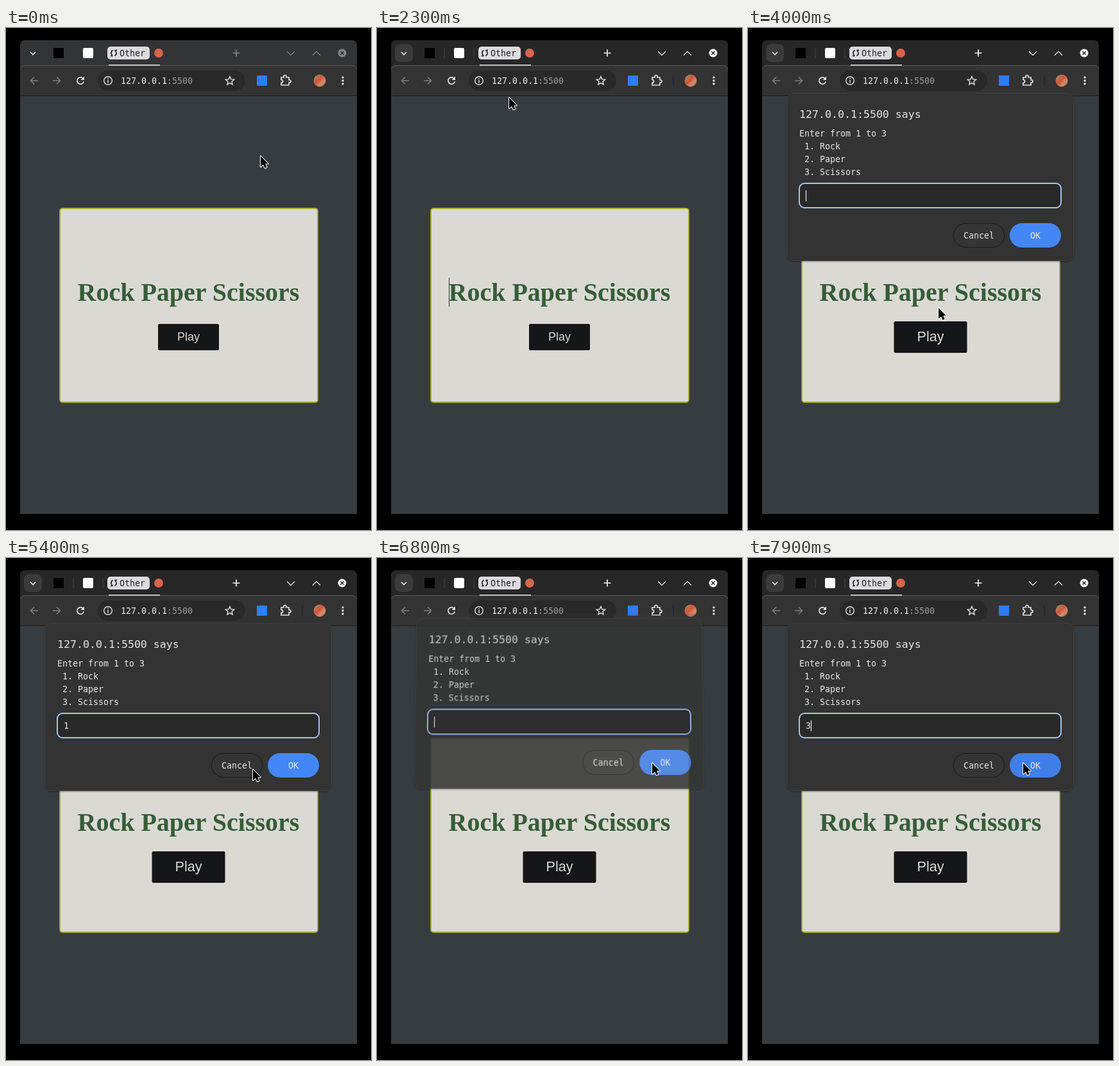
An HTML page for the animation above (8 s loop, 569x782 px).

```html
<!DOCTYPE html>
<html lang="en">
<head>
<meta charset="utf-8">
<title>Rock Paper Scissors</title>
<style>
  html, body { margin: 0; width: 100%; height: 100%; overflow: hidden; background: #000; }
  #stage { position: relative; width: 100%; height: 100%; overflow: hidden; contain: strict; }
  svg { position: absolute; left: 0; top: 0; width: 569px; height: 782px; overflow: hidden; }
  text { white-space: pre; }
  .mono { font: 13.3px "DejaVu Sans Mono", monospace; }
  .line { fill: none; stroke: #e3e3e3; stroke-width: 1.7; }
  .strip { fill: #333435; }
  .controls { color: #858585; }
  .controls .line { stroke: currentColor; }
  .focus { visibility: hidden; }
  .active .strip { fill: #272727; }
  .active .controls { color: #f2f2f2; }
  .active .focus { visibility: visible; }
  #play { transform-origin: 284.5px 481.5px; }
  svg.dialog { left: 50px; top: 90px; width: 470px; height: 290px; transform-origin: 234px 142px; fill: #e6e6e6; }
  .dialog .panel { filter: drop-shadow(0 1px 1px #0006); }
  .ok { fill: #4387f6; }
  .ok.hover { fill: #417fe8; }
  #pointer path { fill: #000; stroke: #fff; stroke-width: 2; stroke-linejoin: round; paint-order: stroke; }
</style>
</head>
<body>
<div id="stage">
<svg id="scene" viewBox="0 0 569 782">
  <defs>
    <linearGradient id="avatar" x2="1" y2="1">
      <stop stop-color="#7fa66a"/><stop offset=".45" stop-color="#d8503c"/>
      <stop offset=".7" stop-color="#c9966c"/><stop offset="1" stop-color="#b83a38"/>
    </linearGradient>
  </defs>
  <path fill="#373c40" d="M22 60H547V757H22Z"/>
  <path class="strip" d="M22 62V27Q22 19 30 19H539Q547 19 547 27V62Z"/>
  <path fill="#333" d="M22 105V66Q22 58 30 58H539Q547 58 547 66V105Z"/>
  <path fill="none" stroke="#5b5b5b" d="M22.5 64Q23 58.5 30 58.5H539Q546 58.5 546.5 64"/>
  <path stroke="#1d1e1f" d="M22 105.5H547"/>

  <!-- tab strip -->
  <rect class="focus" x="28" y="25" width="28" height="28" rx="8" fill="#3b3b3b"/>
  <path class="line" d="M38 37.5L42 41.5 46 37.5"/>
  <rect x="74" y="31" width="16" height="16" fill="#000"/>
  <rect x="120" y="31" width="16" height="16" rx="2" fill="#fff"/>
  <path class="focus" stroke="#454545" d="M105 31V47M151 31V47"/>
  <rect x="158" y="29" width="66" height="20" rx="5" fill="#dcdcde"/>
  <path fill="none" stroke="#1c1c1c" stroke-width="1.7" d="M166.5 34.5A5 5 0 0 0 166 43M166.5 43.5H163M169.5 43.5A5 5 0 0 0 170 35M169.5 34.5H173"/>
  <text class="mono" x="177" y="44" fill="#222">Other</text>
  <circle cx="238" cy="39" r="7" fill="#d9644c"/>
  <path stroke="#e4e4e4" stroke-width="1.6" d="M160 57.8H240"/>
  <g class="controls">
    <path class="line" d="M353.5 39H364.5M359 33.5V44.5"/>
    <path class="line" style="stroke-width:1.1" d="M438 36.5L444 42.5 450 36.5M478 42.5L484 36.5 490 42.5"/>
    <circle cx="524" cy="39" r="6.5" fill="currentColor"/>
    <path stroke="#272727" stroke-width="1.5" d="M521.5 36.5L526.5 41.5M526.5 36.5L521.5 41.5"/>
  </g>

  <!-- toolbar -->
  <path class="line" style="stroke:#7d7d7d" d="M50 82H39M44 76.5L38.5 82 44 87.5M73 82H84M79 76.5L84.5 82 79 87.5"/>
  <path class="line" d="M120.5 79A5.3 5.3 0 1 0 121.3 83.5"/>
  <path fill="#e3e3e3" d="M122 75.5V81H116.5Z"/>
  <rect x="143" y="66" width="230" height="32" rx="16" fill="#292929"/>
  <circle class="line" style="stroke-width:1.4" cx="159" cy="82" r="6.3"/>
  <path class="line" style="stroke-width:1.5" d="M159 81V85.5M159 78.2V79.8"/>
  <text class="mono" x="179" y="87" fill="#ededed">127.0.0.1<tspan fill="#9b9b9b">:5500</tspan></text>
  <path class="line" style="stroke-width:1.4" d="M349 75.5L350.9 79.9 355.7 80.3 352 83.4 353.1 88.1 349 85.6 344.9 88.1 346 83.4 342.3 80.3 347.1 79.9Z"/>
  <rect x="391" y="74" width="16" height="16" fill="#2f7cf6"/>
  <path class="line" d="M429 77H433V75.5A2 2 0 0 1 437 75.5V77H441V81H442A2 2 0 0 1 442 85H441V89H429V85.5A2.5 2.5 0 0 0 429 80.5Z"/>
  <path class="focus" stroke="#252b35" stroke-width="2" d="M462 74V90"/>
  <circle cx="489" cy="82" r="9.5" fill="url(#avatar)"/>
  <g fill="#e8e8e8"><circle cx="525" cy="77" r="1.7"/><circle cx="525" cy="82" r="1.7"/><circle cx="525" cy="87" r="1.7"/></g>

  <!-- page -->
  <rect x="84" y="281" width="402" height="302" rx="4" fill="#dad9d4" stroke="#a5ae2a" stroke-width="1.8"/>
  <text x="111.5" y="425" fill="#365d38" font-family="Liberation Serif, serif" font-weight="700" font-size="40">Rock Paper Scissors</text>
  <path id="textCaret" stroke="#333" d="M112.5 389V434"/>
  <g id="play">
    <rect x="237" y="461" width="95" height="41" rx="2" fill="#151618"/>
    <text x="284.5" y="487" fill="#dad9d4" text-anchor="middle" font-family="Liberation Sans, sans-serif" font-size="18">Play</text>
  </g>
</svg>

<svg class="dialog mono" viewBox="50 90 470 290">
  <rect class="panel" x="60.5" y="101.5" width="447" height="261" rx="10" fill="#333" stroke="#414141"/>
  <text x="80" y="140" font-size="16.6">127.0.0.1:5500 says</text>
  <text x="80" y="169">Enter from 1 to 3</text>
  <text x="80" y="189"> 1. Rock</text>
  <text x="80" y="209"> 2. Paper</text>
  <text x="80" y="229"> 3. Scissors</text>
  <rect x="80" y="242" width="408" height="38" rx="8" fill="#292929" stroke="#a8c2f5" stroke-width="2"/>
  <text class="value" x="90" y="266"></text>
  <path class="caret" stroke="#eee" stroke-width="1.2" d="M90.5 253V270"/>
  <rect x="320.5" y="304.5" width="79" height="37" rx="18.5" fill="#353535" stroke="#1b1b1b"/>
  <text x="360" y="328" text-anchor="middle">Cancel</text>
  <rect class="ok" x="408" y="304" width="80" height="38" rx="19"/>
  <text x="448" y="328" text-anchor="middle">OK</text>
</svg>

<svg viewBox="0 0 569 782">
  <g id="pointer">
    <path id="arrow" d="M0 .5V17.5L4 13.8 6.7 19.3 9.6 18 7.1 12.6H11.8Z"/>
    <path id="hand" d="M-2.5 1.5A1.8 1.8 0 0 1 1 .8L2.5 7.5 10 9Q13.5 10 13.3 13L12.5 21.5H2L-4.5 14Q-5 11.5-2.5 11.5L0 13Z"/>
  </g>
</svg>
</div>

<script>
const LOOP = 8000, STEP = 100;
const $ = selector => document.querySelector(selector);

// Points are [position, ...values]; values are joined linearly.
function track(points, at) {
  const next = points.findIndex(p => p[0] > at);
  if (next === 0) return points[0].slice(1);
  if (next < 0) return points.at(-1).slice(1);
  const a = points[next - 1], b = points[next];
  const f = (at - a[0]) / (b[0] - a[0]);
  return a.slice(1).map((v, i) => v + (b[i + 1] - v) * f);
}

const cursorPath = [
  [0, 397, 199], [100, 330, 172], [200, 248, 132], [300, 206, 108],
  [2400, 206, 108], [2600, 250, 55], [2700, 320, 36], [2800, 395, 75],
  [2900, 435, 170], [3000, 415, 300], [3100, 365, 405], [3200, 318, 464], [3300, 297, 480],
  [3700, 297, 480], [4200, 297, 406], [4300, 297, 406], [4500, 298, 404],
  [5000, 298, 404], [5200, 328, 374], [5400, 385, 329], [5600, 415, 321], [5900, 429, 319]
];

// Dialog poses: [phase, opacity, tilt]
const opening = [[0, 0, 1], [1, .22, 1], [2, .84, .43], [3, 1, 0]];
const closing = [[0, .92, .1], [1, .6, .5], [2, .2, .85], [3, 0, 1]];

const rounds = [
  { start: 3400, span: 300, typed: 4400, key: "1" },
  { start: 5900, span: 200, typed: 6200, key: "2" },
  { start: 6600, span: 300, typed: 7000, key: "2" },
  { start: 7500, span: 300, typed: 7900, key: "3" }
];

const current = $(".dialog");
const previous = current.cloneNode(true);
current.before(previous);

function poseDialog(el, [opacity, tilt], value, hover, caret) {
  el.style.opacity = opacity;
  el.style.transform = tilt
    ? `translateY(${-15 * tilt}px) perspective(1000px) rotateX(${8.2 * tilt}deg) scale(${1 + .007 * tilt}, ${1 + .04 * tilt})`
    : "none";
  el.querySelector(".value").textContent = value;
  const mark = el.querySelector(".caret");
  mark.style.visibility = caret ? "inherit" : "hidden";
  mark.setAttribute("transform", `translate(${value.length * 8})`);
  el.querySelector(".ok").classList.toggle("hover", hover);
}

function drawDialogs(t, hover) {
  const index = rounds.findLastIndex(r => t >= r.start);
  const visible = index >= 0;
  current.style.display = previous.style.display = visible ? "" : "none";
  if (!visible) return;
  const round = rounds[index], last = rounds[index - 1];
  const phase = (t - round.start) / round.span * 3;
  const caret = t < 5100 || t >= 5600;
  poseDialog(current, track(opening, phase), t >= round.typed ? round.key : "", hover, caret);
  poseDialog(previous, last ? track(closing, phase) : [0, 0], last ? last.key : "", hover, caret);
}

function draw(t) {
  const [x, y] = track(cursorPath, t);
  const onPlay = t >= 3200 && t < 3700;
  document.body.classList.toggle("active", t >= 2300);
  $("#textCaret").style.visibility = t >= 2300 && t < 2800 ? "visible" : "hidden";
  $("#play").style.transform = `scale(${track([[3100, 1], [3300, 1.2]], t)[0]})`;
  $("#pointer").setAttribute("transform", `translate(${x} ${y})`);
  $("#arrow").style.display = onPlay ? "none" : "";
  $("#hand").style.display = onPlay ? "" : "none";
  drawDialogs(t, x >= 408 && t > 5000);
}

let origin;
function tick(now) {
  origin ??= now;
  // The small lead absorbs display latency.
  draw(Math.floor((now - origin + 15) / STEP) * STEP % LOOP);
  requestAnimationFrame(tick);
}
draw(0);
requestAnimationFrame(tick);
</script>
</body>
</html>
```
